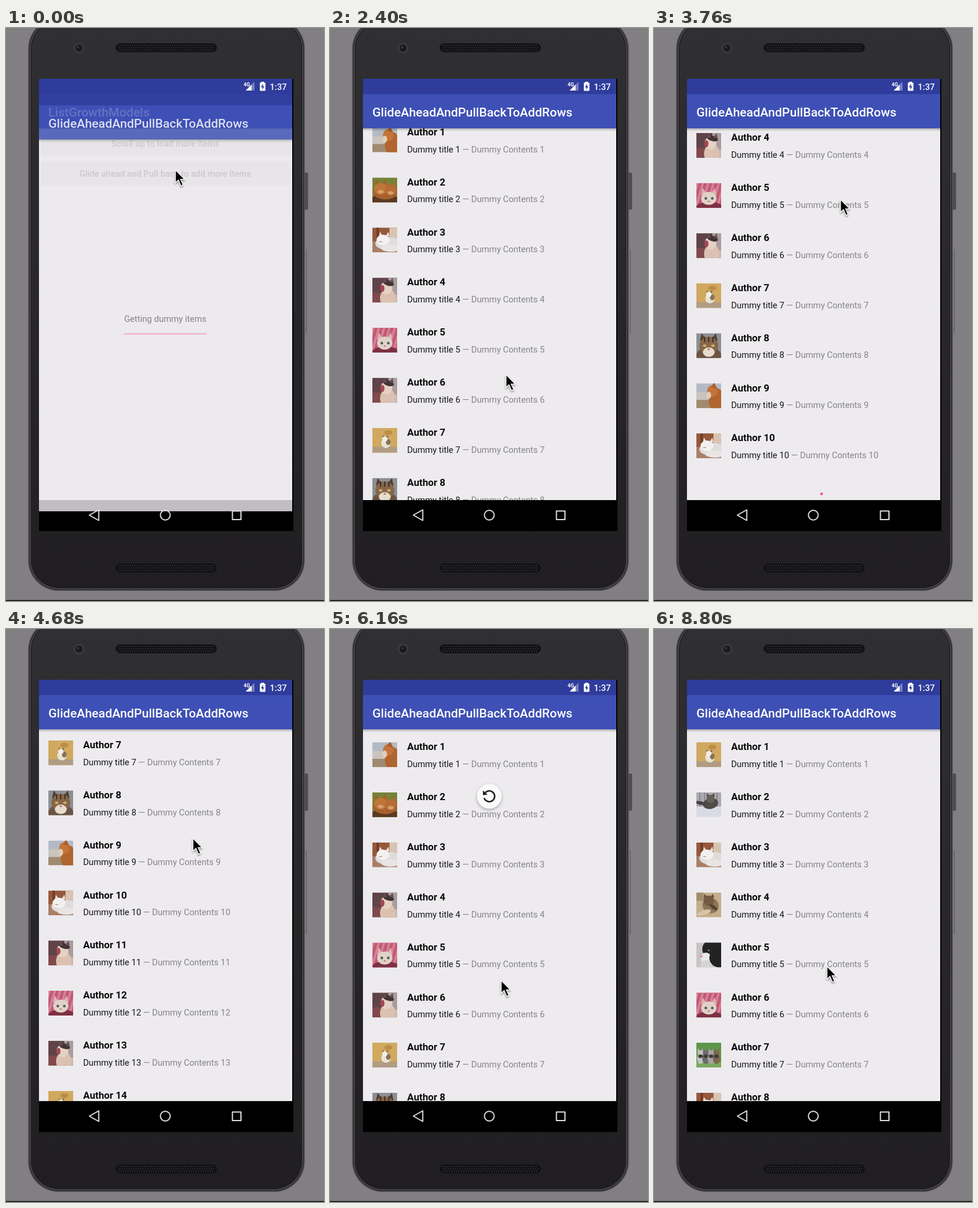
Animation of 540x971 px, one loop 8.84 s. Source, as an HTML page with a canvas:

```html
<!DOCTYPE html>
<html lang="en">
<head>
<meta charset="utf-8">
<title>Growing list</title>
<style>
html, body { margin: 0; width: 100%; height: 100%; overflow: hidden; background: #827f82; }
canvas { display: block; }
</style>
</head>
<body>
<canvas id="stage" width="540" height="971"></canvas>
<script>
const ctx = document.getElementById('stage').getContext('2d');
const LOOP = 8840, STEP = 40;
const LEFT = 56, RIGHT = 486, TOP = 170, BOTTOM = 800, MID = 270.5;
const ROW = 84.85, END = 268.6;
const SHOW = 1240, MORE = 4080, RENEW = 7440;
const BLUE = '#3e50b5', DARK = '#2f3c9c', PAPER = '#edebee', PINK = '#ff4081';
const FACE = 'Roboto, "Noto Sans", sans-serif';
const SMALL = 14.64, LARGE = 16.73;
const TITLE = 'GlideAheadAndPullBackToAddRows';

const clamp = (v, a = 0, b = 1) => Math.min(b, Math.max(a, v));
const part = (t, a, b) => clamp((t - a) / (b - a));
const smooth = u => u * u * (3 - 2 * u);
const rad = d => d * Math.PI / 180;

// Eased value between [time, value] keys
function track(keys, t) {
  let a = keys[0];
  for (const b of keys) {
    if (t < b[0]) return a === b ? b[1] : a[1] + (b[1] - a[1]) * smooth(part(t, a[0], b[0]));
    a = b;
  }
  return a[1];
}

function rect(c, x, y, w, h) { ctx.fillStyle = c; ctx.fillRect(x, y, w, h); }

function round(c, x, y, w, h, r) {
  ctx.fillStyle = c;
  ctx.beginPath();
  ctx.roundRect(x, y, w, h, r);
  ctx.fill();
}

function oval(c, x, y, rx, ry = rx, turn = 0) {
  ctx.fillStyle = c;
  ctx.beginPath();
  ctx.ellipse(x, y, rx, ry, turn, 0, 7);
  ctx.fill();
}

function poly(c, ...p) {
  ctx.fillStyle = c;
  ctx.beginPath();
  for (let i = 0; i < p.length; i += 2) ctx.lineTo(p[i], p[i + 1]);
  ctx.closePath();
  ctx.fill();
}

function arc(c, x, y, r, a, b, w) {
  ctx.strokeStyle = c;
  ctx.lineWidth = w;
  ctx.beginPath();
  ctx.arc(x, y, r, rad(a), rad(b));
  ctx.stroke();
}

function text(s, x, y, size, weight, c, align = 'left') {
  ctx.font = `${weight} ${size}px ${FACE}`;
  ctx.fillStyle = c;
  ctx.textAlign = align;
  ctx.fillText(s, x, y);
  return ctx.measureText(s).width;
}

function fade(c0, c1, x0, y0, x1, y1) {
  const g = ctx.createLinearGradient(x0, y0, x1, y1);
  g.addColorStop(0, c0);
  g.addColorStop(1, c1);
  return g;
}

function inside(x, y, w, h, draw) {
  ctx.save();
  ctx.beginPath();
  ctx.rect(x, y, w, h);
  ctx.clip();
  draw();
  ctx.restore();
}

function ears(c, x, y, w, h) {
  poly(c, x - w, y, x - w * .8, y - h, x - w * .2, y);
  poly(c, x + w, y, x + w * .8, y - h, x + w * .2, y);
}

// Simplified pictures on a 42 px square
const pics = {
  ginger() {
    rect('#b4bac5', 0, 0, 42, 20);
    rect('#c9c4bd', 0, 15, 42, 14);
    rect('#a08a70', 0, 28, 42, 14);
    oval('#b0652f', 34, 28, 13, 20);
    oval('#c2743a', 27, 13, 9, 10);
    poly('#ad602b', 25, 6, 30, -2, 36, 10);
    oval('#e2cdb8', 21, 20, 4, 6);
  },
  pair() {
    rect('#768237', 0, 0, 42, 42);
    oval('#5b3a20', 21, 38, 25, 9);
    oval('#a7602e', 22, 24, 21, 13);
    ears('#a85c29', 14, 12, 9, 8);
    ears('#b06a34', 31, 15, 9, 8);
    oval('#bf7639', 14, 19, 11, 10);
    oval('#b76d35', 31, 21, 10, 9);
    oval('#d7a06b', 14, 24, 5, 3);
    oval('#d7a06b', 31, 26, 5, 3);
  },
  sleeper() {
    rect('#96583a', 0, 0, 42, 24);
    rect('#6f3d29', 7, 0, 4, 22);
    rect('#d8c4b2', 29, 0, 13, 22);
    rect('#a97f66', 0, 23, 42, 19);
    oval('#dfdcdd', 27, 27, 22, 11);
    ears('#e9dedb', 20, 15, 9, 8);
    oval('#f3f0f0', 18, 21, 11, 9);
    oval('#b8a9a4', 14, 24, 3, 1);
    oval('#e9e5e4', 31, 35, 16, 6);
  },
  yawn() {
    rect('#604349', 0, 0, 42, 42);
    rect('#a99c9f', 27, 0, 15, 28);
    rect('#81494b', 0, 25, 14, 17);
    rect('#c9b8b4', 30, 28, 12, 14);
    oval('#dcc1b0', 26, 35, 13, 17);
    oval('#e5d1c4', 24, 17, 10, 11);
    oval('#413437', 27, 9, 10, 4.5, .3);
    ears('#66504e', 27, 8, 9, 8);
    oval('#a34850', 17, 18, 3.5, 6);
  },
  pink() {
    rect('#c05a75', 0, 0, 42, 42);
    for (let i = -2; i < 6; i++) poly('#d98199', i * 9, 0, i * 9 + 4, 0, i * 9 - 8, 42, i * 9 - 12, 42);
    oval('#7d3144', 22, 40, 22, 8);
    ears('#ddb5ad', 21, 20, 13, 12);
    oval('#e0d2c8', 21, 26, 13, 11);
    oval('#53605f', 16, 26, 2.3);
    oval('#53605f', 27, 26, 2.3);
    oval('#c6827f', 21, 31, 2, 1.3);
  },
  sand() {
    rect('#d0a95f', 0, 0, 42, 42);
    rect('#b19c83', 0, 32, 42, 10);
    oval('#bd8d46', 27, 8, 7, 4);
    oval('#e9e3d7', 23, 26, 8, 8);
    oval('#887158', 27, 24, 4, 5);
    ears('#73634f', 22, 16, 5, 4);
    oval('#f1eee8', 21, 19, 4.5, 4.5);
  },
  tabby() {
    rect('#8c8f94', 0, 0, 42, 42);
    oval('#6b5441', 21, 38, 21, 15);
    ears('#533e30', 21, 13, 15, 13);
    oval('#866549', 21, 21, 16, 15);
    for (const x of [14, 21, 28]) rect('#3f3027', x - 1, 6, 2, 9);
    oval('#c9b568', 14, 21, 3, 2);
    oval('#c9b568', 28, 21, 3, 2);
    oval('#e6dccf', 21, 32, 10, 8);
    oval('#b56f5a', 21, 27, 2, 1.4);
  },
  snow() {
    rect('#a9a9b0', 0, 0, 42, 25);
    rect('#d9dbe4', 0, 24, 42, 18);
    for (const x of [5, 13, 34]) rect('#817f84', x, 0, 1.5, 24);
    oval('#504b49', 24, 19, 13, 9, -.2);
    ears('#4a4544', 24, 7, 7, 6);
    oval('#67605a', 24, 11, 7, 7);
    oval('#47413f', 7, 18, 9, 3, .2);
  },
  lounger() {
    rect('#c4ad8b', 0, 0, 42, 42);
    rect('#a38c6c', 0, 0, 12, 14);
    oval('#8d7555', 24, 22, 14, 13, .5);
    ears('#675039', 21, 9, 9, 7);
    oval('#735b42', 21, 14, 9, 9);
    oval('#554434', 29, 25, 8, 3, .6);
    oval('#d7c5a9', 13, 34, 12, 4, -.3);
  },
  profile() {
    rect('#c6c4c5', 0, 0, 42, 42);
    oval('#242326', 31, 11, 21, 18);
    oval('#e9e7e8', 16, 26, 9, 9, -.5);
    oval('#d5d2d3', 17, 38, 10, 8);
    oval('#222124', 39, 26, 17, 16);
    oval('#cda4a4', 8, 23, 2.5, 2.5);
    oval('#858b6f', 21, 13, 1.5);
  },
  litter() {
    rect('#5d9549', 0, 0, 42, 42);
    rect('#79a95f', 0, 33, 42, 9);
    for (let i = 0; i < 4; i++) {
      const x = 7 + i * 9, c = ['#c2c1be', '#6b6a6a', '#a5a4a3', '#7d6650'][i];
      oval(c, x, 27, 6, 9);
      ears(c, x, 15, 5, 6);
      oval(c, x, 18, 5, 5);
      oval('#403d3b', x, 23, 4, 3);
    }
  }
};
const first = ['ginger', 'pair', 'sleeper', 'yawn', 'pink', 'yawn', 'sand', 'tabby', 'ginger', 'sleeper'];
const fresh = ['sand', 'snow', 'sleeper', 'lounger', 'profile', 'pink', 'litter', 'sleeper', 'tabby', 'pair'];

function grille(y) {
  round('#111012', 186, y, 172, 15, 7.5);
  for (let r = 0; r < 3; r++)
    for (let x = 191 + (r % 2) * 2; x < 355; x += 4) oval('#39373a', x, y + 3.5 + r * 4, 1.1);
}

// One layer of the casing, inset from its outer edge
function shell(c, inset) {
  round(c, 37.5 + inset, -17 + inset, 470 - 2 * inset, 971 - 2 * inset, 52 - inset);
}

function phone() {
  rect('#827f82', 0, 0, 540, 971);
  rect('#0b0a0b', 0, 969.5, 540, 1.5);
  round('#4f4d50', 505, 245, 8, 63, 2);
  rect('#6b696c', 509, 375, 2, 142);
  shell('#5a585b', 0);
  shell('#343235', 1.2);
  shell('#59575a', 3.6);
  shell('#1b1a1c', 4.6);
  shell(fade('#302f31', '#201e20', 0, 0, 0, 954), 6);
  oval('#3c3a3d', 124, 34, 9);
  oval('#19181a', 124, 34, 6);
  oval('#38363b', 122.5, 32.5, 2);
  grille(26);
  grille(907.5);
  rect('#000', LEFT, 86, 432, 766.5);
}

function bars(title) {
  rect(DARK, LEFT, 86, 430, 26);
  rect(BLUE, LEFT, 112, 430, 58);
  text(title, 72, 149.5, 21, 500, '#fff');
}

function shadow() {
  rect(fade('rgba(0,0,0,.26)', 'rgba(0,0,0,0)', 0, TOP, 0, TOP + 5), LEFT, TOP, 430, 5);
}

function status() {
  text('4G', 403.5, 98.5, 8.5, 700, '#fff');
  poly('rgba(255,255,255,.35)', 407, 106, 422, 106, 422, 91);
  poly('#fff', 407, 106, 417, 106, 417, 96);
  rect('#fff', 433.5, 91, 4.5, 2);
  round('#fff', 431, 92.5, 9.5, 14, 1);
  poly(DARK, 436.5, 94, 433, 100.5, 435.5, 100.5, 435, 105, 438.7, 98.7, 436.3, 98.7);
  text('1:37', 448, 104.5, SMALL, 500, '#fff');
}

function nav() {
  ctx.strokeStyle = '#dedede';
  ctx.lineWidth = 2;
  ctx.lineJoin = 'round';
  ctx.beginPath();
  ctx.moveTo(141.5, 825.5);
  ctx.lineTo(157.5, 816.5);
  ctx.lineTo(157.5, 834.5);
  ctx.closePath();
  ctx.stroke();
  arc('#dedede', MID, 825.5, 8.3, 0, 360, 2);
  ctx.strokeRect(384.5, 818.5, 14.5, 14.5);
}

function menu() {
  rect(PAPER, LEFT, TOP, 430, 630);
  const labels = ['Scroll up to load more items', 'Glide ahead and Pull back to add more items'];
  labels.forEach((s, i) => {
    round('#cfced1', 59, 175 + i * 50.5, 424, 41, 2);
    text(s, MID, 201 + i * 50.5, SMALL, 500, '#3a3a3c', 'center');
  });
  shadow();
  bars('ListGrowthModels');
}

function waiting(t) {
  text('Getting dummy items', MID, 478.5, SMALL, 400, '#6b6a6d', 'center');
  rect('rgba(255,64,129,.4)', 200.5, 498, 140, 2.5);
  inside(200.5, 498, 140, 3, () => {
    const u = part(t, 40, 1300);
    rect(PINK, 200 + 210 * u * u, 498, 90 * smooth(clamp(u * 2)), 2.5);
  });
}

const sweep = x => 1 - (1 - x * x) ** 4;

function spinner(t, y) {
  const p = ((t - 2840) / 1333 + 2.345) % 1;
  const base = 36 + (t - 3760) * .1225 + 90 * p;
  const a = base + 270 * sweep(clamp(p * 2 - 1));
  const b = base + 270 * sweep(clamp(p * 2)) + 6;
  arc(PINK, MID, y, 19.8, a, b, 4);
}

function scrollAt(t) {
  if (t < 4660) return track([[2340, 0], [2670, END], [4160, END], [4620, 540]], t);
  if (t < 5432) return 540 * (1 - part(t, 4660, 5432)) ** 2;
  return track([[7620, 0], [7960, 170], [8100, 170], [8500, 0]], t);
}

function list(t) {
  const scroll = scrollAt(t), count = t < MORE ? 10 : 20;
  const set = t < RENEW ? first : fresh;
  for (let i = 0; i < count; i++) {
    const y = 192 + i * ROW - scroll;
    if (y < 110 || y > BOTTOM) continue;
    ctx.save();
    ctx.translate(72, y);
    inside(0, 0, 42, 42, pics[set[(i + (i > 9 ? 3 : 0)) % 10]]);
    ctx.restore();
    const n = i + 1;
    text('Author ' + n, 131, y + 13.3, LARGE, 700, '#0c0c0d');
    const w = text(`Dummy title ${n} `, 131, y + 42, SMALL, 400, '#161617');
    text('— Dummy Contents ' + n, 131 + w, y + 42, SMALL, 400, '#858487');
  }
  if (t < MORE) spinner(t, TOP + 10 * ROW + 25.5 - scroll);
}

function glow(t) {
  const k = smooth(part(t, 2640, 2800)) * (1 - smooth(part(t, 2860, 3400)));
  if (!k) return;
  ctx.fillStyle = `rgba(63,81,181,${.27 * k})`;
  const h = 42 * k, edge = 25 * k;
  ctx.beginPath();
  ctx.moveTo(LEFT, BOTTOM);
  ctx.lineTo(LEFT, BOTTOM - edge);
  ctx.quadraticCurveTo(MID, BOTTOM - 2 * h + edge, RIGHT, BOTTOM - edge);
  ctx.lineTo(RIGHT, BOTTOM);
  ctx.fill();
}

function refresher(t) {
  if (t < 5780 || t > RENEW + 160) return;
  const y = track([[5780, 148], [6140, 283.5], [6260, 283.5], [6460, 216]], t);
  const size = 1 - part(t, RENEW, RENEW + 160);
  const pull = part(y, 148, 270), spin = t > 6260;
  ctx.save();
  ctx.translate(MID, y);
  ctx.scale(size, size);
  ctx.shadowColor = 'rgba(0,0,0,.3)';
  ctx.shadowBlur = 5;
  ctx.shadowOffsetY = 2;
  oval('#fafafa', 0, 0, 21);
  ctx.shadowColor = 'transparent';
  if (spin) {
    const turn = (t - 6260) * .3;
    arc('#1d1d1e', 0, 0, 9.2, turn, turn + 160 + 120 * Math.cos((t - 6260) / 212), 2.6);
  } else {
    ctx.globalAlpha = .3 + .7 * pull;
    ctx.rotate(rad((pull - 1) * 180));
    arc('#1d1d1e', 0, 0, 9.2, 222, 222 + 300 * pull, 2.6);
    poly('#1d1d1e', -10.8, -10, -10.8, -2, -3, -2.8);
  }
  ctx.restore();
}

function app(t) {
  rect(PAPER, LEFT, TOP, 430, 630);
  inside(LEFT, TOP, 430, 630, () => {
    if (t < SHOW) waiting(t);
    else {
      list(t);
      glow(t);
      refresher(t);
    }
  });
  shadow();
  bars(TITLE);
}

const pathX = [[0, 288], [1200, 284], [1760, 275], [2250, 296], [2320, 298], [2760, 312], [3200, 312],
  [3760, 317], [4520, 318], [4640, 318], [4860, 315], [5440, 315], [5720, 296], [6120, 291],
  [7600, 292], [7960, 296], [8500, 294]];
const pathY = [[0, 240], [1200, 262], [1760, 300], [2250, 620], [2320, 620], [2760, 240], [3200, 240],
  [3760, 290], [4120, 560], [4160, 560], [4520, 330], [4640, 330], [4860, 606], [5440, 606],
  [5720, 340], [5780, 340], [6120, 595], [7600, 590], [7960, 420], [8100, 420], [8500, 571]];

function cursor(t) {
  ctx.save();
  ctx.translate(track(pathX, t), track(pathY, t) + 1);
  ctx.shadowColor = 'rgba(0,0,0,.4)';
  ctx.shadowBlur = 3;
  ctx.shadowOffsetY = 2;
  poly('#fff', -1, -2, -1, 23, 4.5, 18, 8.7, 27.5, 13.5, 25.3, 9.3, 16.3, 17, 16.3);
  ctx.shadowColor = 'transparent';
  poly('#000', .4, 1.2, .4, 19.7, 5, 15.5, 9.3, 25.4, 11.8, 24.4, 7.4, 14.8, 13.8, 14.8);
  ctx.restore();
}

function draw(t) {
  phone();
  const rise = (1 - part(t, 0, 180)) ** 2;
  if (rise) {
    menu();
    inside(LEFT, 86, 430, 766, () => {
      ctx.globalAlpha = .81 + .19 * part(t, 0, 80);
      ctx.translate(0, Math.round(19 * rise));
      app(t);
    });
    rect(DARK, LEFT, 86, 430, 26);
  } else app(t);
  status();
  nav();
  cursor(t);
}

const start = performance.now();
function tick() {
  const t = (performance.now() - start) % LOOP;
  draw(Math.floor(t / STEP) * STEP);
  requestAnimationFrame(tick);
}
tick();
</script>
</body>
</html>
```
